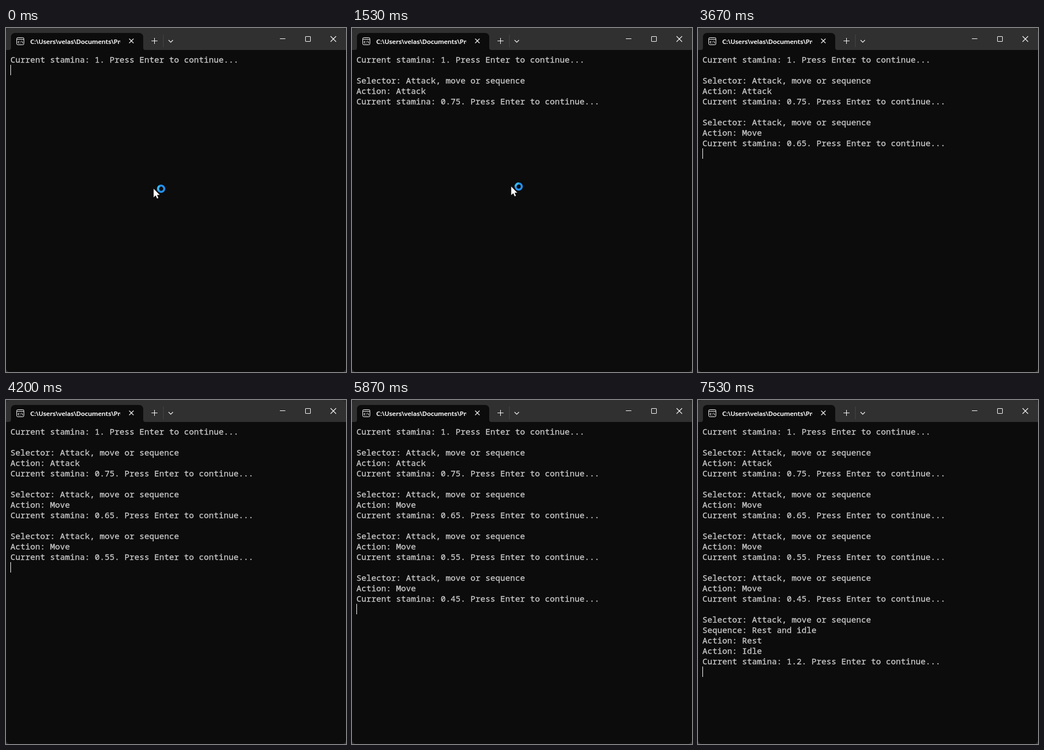
Write an HTML page that moves like this. It is 617x626 px and loops after 8 s.

```html
<!DOCTYPE html>
<html lang="en">
<head>
<meta charset="utf-8">
<title>Stamina console</title>
<style>
  html, body { margin: 0; width: 100%; height: 100%; overflow: hidden; background: #2a2a2a; }
  svg { display: block; }
  #lines { font: 500 15px "Noto Sans Mono", monospace; fill: #ccc; stroke: #ccc; stroke-width: .3; white-space: pre; }
  .title { font: 600 11.5px "Open Sans", sans-serif; fill: #fff; stroke: #fff; stroke-width: .2; }
  .icon { fill: none; stroke: #fff; }
</style>
</head>
<body>
<svg width="617" height="626" viewBox="0 0 617 626">
  <defs>
    <clipPath id="window"><rect width="617" height="626" rx="7"/></clipPath>
    <clipPath id="label"><rect x="44" y="10" width="164" height="28"/></clipPath>
  </defs>
  <g clip-path="url(#window)">
    <rect width="617" height="626" fill="#0c0c0c"/>
    <rect width="617" height="40" fill="#303030"/>
    <path d="M5 40Q9 40 9 36V17Q9 9 17 9H241Q249 9 249 17V36Q249 40 253 40Z" fill="#0c0c0c"/>
  </g>

  <g class="icon">
    <rect x="19.5" y="17.5" width="13" height="13" rx="2"/>
    <path d="M20 20.5H32"/>
    <path d="M24.3 24.2Q22 23.2 22 25.7T24.3 27.4M26.5 24V25M26.5 26.7V27.7M28.5 23.3L30.5 28"/>
    <path d="M223.5 19.5L231.5 27.5M231.5 19.5L223.5 27.5" stroke-width="1.1"/>
    <path d="M264 23.5H275M269.5 18V29"/>
    <path d="M295 22L299 26L303 22" stroke-width="1.1"/>
    <path d="M497 19.5H507"/>
    <rect x="543.5" y="15.5" width="9" height="9" rx=".4"/>
    <path d="M589 15L599 25M599 15L589 25" stroke-width="1.1"/>
  </g>
  <path d="M285.5 12V35" stroke="#454545"/>
  <g clip-path="url(#label)"><text class="title" x="44" y="29">C:\Users\velas\Documents\Projects</text></g>

  <g id="lines"></g>
  <rect id="caret" x="8" width="1" height="19" fill="#fff"/>
  <g id="pointer">
    <path d="M-.3 0V16.6L3.6 13L6 18.6L8.8 17.4L6.5 12H11.4Z" fill="#fff" stroke="#000" stroke-width=".5"/>
    <g id="ring" fill="none" stroke-width="3.8">
      <circle r="5.6" stroke="#2490ee"/>
      <path d="M-5.6 0A5.6 5.6 0 0 1 0 -5.6" stroke="#36b8f6"/>
    </g>
  </g>
</svg>
<script>
const LOOP = 8000, LINE = 19, TOP = 48;
const $ = id => document.getElementById(id);

const prompt = stamina => `Current stamina: ${stamina}. Press Enter to continue...`;
const turn = (stamina, ...steps) =>
  ["", "Selector: Attack, move or sequence", ...steps, prompt(stamina)];

const outputs = [
  [0, [prompt(1)]],
  [930, turn(0.75, "Action: Attack")],
  [2530, turn(0.65, "Action: Move")],
  [4200, turn(0.55, "Action: Move")],
  [5870, turn(0.45, "Action: Move")],
  [7530, turn(1.2, "Sequence: Rest and idle", "Action: Rest", "Action: Idle")],
];
const caretOff = [[730, 930], [1530, 2070], [3130, 3670], [4730, 5330], [6470, 7000]];
// time, x, y, ring angle
const pointerSteps = [[0, 268, 292, -30], [70, 288, 288, -45], [400, 289, 288, -60], [1530, 289, 288, 0]];
const pointerShown = [[0, 930], [1530, 2470]];

const within = (t, spans) => spans.some(([from, to]) => t >= from && t < to);
const show = (node, on) => node.setAttribute("visibility", on ? "visible" : "hidden");

const rows = [];
for (const [time, texts] of outputs) {
  for (const text of texts) {
    const node = document.createElementNS("http://www.w3.org/2000/svg", "text");
    node.setAttribute("x", 8);
    node.setAttribute("y", TOP + 15 + LINE * rows.length);
    node.textContent = text;
    $("lines").append(node);
    rows.push({ time, node });
  }
}

function draw(t) {
  for (const { time, node } of rows) show(node, t >= time);
  const printed = rows.filter(row => t >= row.time).length;
  $("caret").setAttribute("y", TOP + LINE * printed);
  show($("caret"), !within(t, caretOff));

  const [, x, y, angle] = pointerSteps.findLast(step => t >= step[0]);
  const pointerOn = within(t, pointerShown);
  $("pointer").setAttribute("transform", `translate(${x} ${y})`);
  $("ring").setAttribute("transform", `translate(13.5 .5) rotate(${angle})`);
  show($("pointer"), pointerOn);
  show($("ring"), pointerOn && t < 2130);
}

const start = performance.now();
function tick() {
  draw((performance.now() - start) % LOOP);
  requestAnimationFrame(tick);
}
tick();
</script>
</body>
</html>
```
